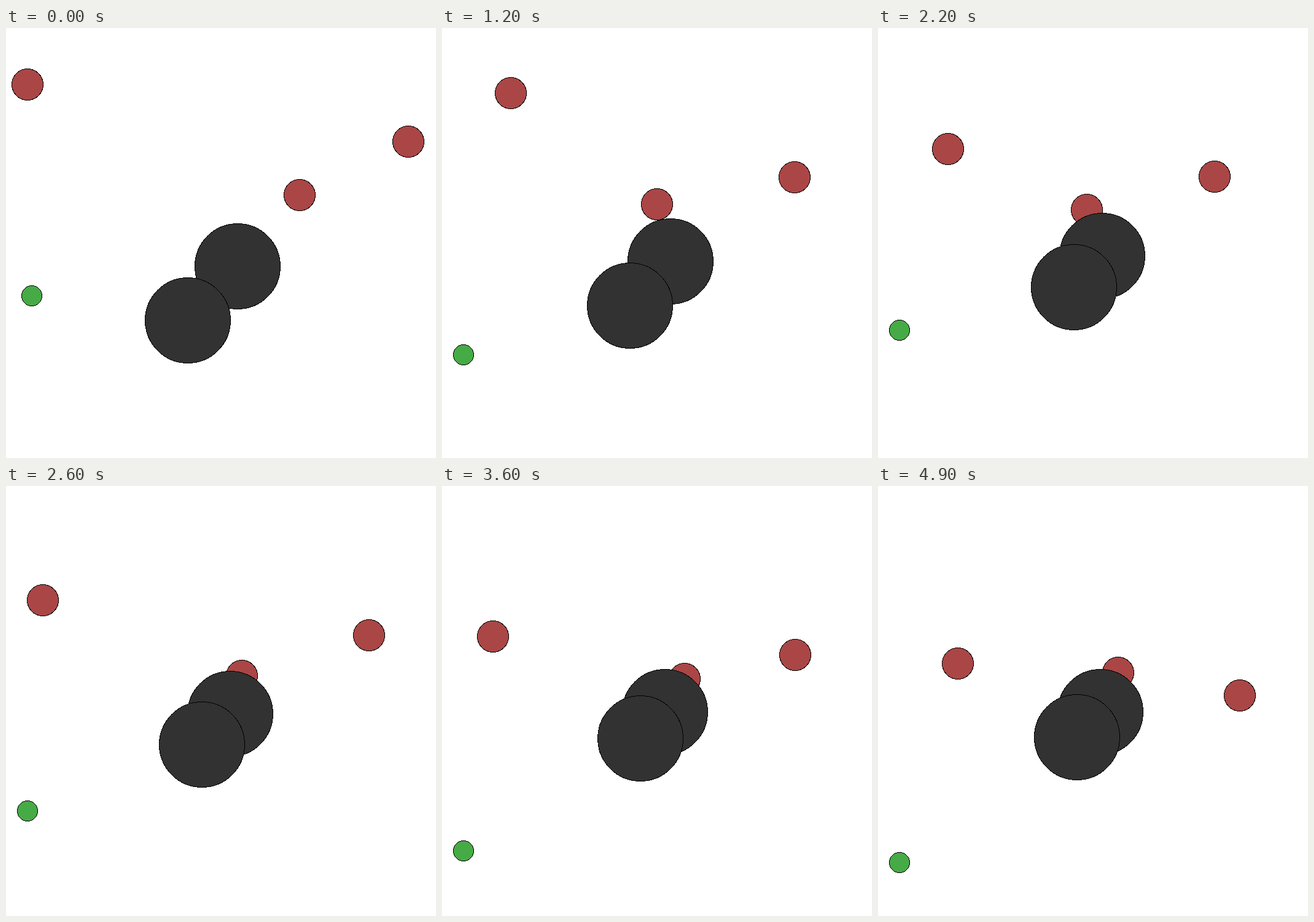
Write an HTML page that moves like this. It is 700 px wide and 700 px high and loops after 5000 ms.

```html
<!DOCTYPE html>
<html>
<head>
<meta charset="utf-8">
<style>
  html, body { margin: 0; height: 100%; overflow: hidden; background: #fff; }
  svg { display: block; }
  circle { stroke: #000; shape-rendering: crispEdges; }
</style>
</head>
<body>
<svg id="stage" width="700" height="700"></svg>
<script>
const FRAME = 100, FRAMES = 50, GAP = 7;

// Smooth curve through values that lie GAP frames apart
function curve(...v) {
  const last = v.length - 1;
  return t => {
    const i = Math.min(Math.floor(t / GAP), last - 1), s = t / GAP - i;
    const b = v[i], c = v[i + 1], a = v[i - 1] ?? b, d = v[i + 2] ?? c;
    return b + s / 2 * (c - a + s * (2 * a - 5 * b + 4 * c - d + s * (3 * (b - c) + d - a)));
  };
}

// The two big balls glide towards each other in step
const approach = curve(.06, .14, .506, .801, .849, .962, .985, 1);
const glide = (from, by) => t => from + by * approach(t);

const red = (x, y) => ({ r: 26, fill: '#aa4646', x, y });
const dark = (x, y) => ({ r: 70, fill: '#323232', x, y });
const green = (x, y) => ({ r: 17, fill: '#46aa46', x, y });

const balls = [
  red(curve(35, 53, 130, 123, 44, 79, 107, 130),
      curve(92, 98, 116, 194, 186, 239, 274, 289)),
  red(curve(655, 614, 561, 543, 604, 575, 593, 589),
      curve(185, 219, 249, 242, 246, 271, 305, 341)),
  red(curve(478, 427, 328, 333, 400, 396, 391, 391),
      curve(272, 293, 285, 293, 314, 314, 309, 304)),
  green(t => Math.max(35, 42 - 2 * t),
        curve(436, 475, 544, 490, 547, 585, 656, 613)),
  dark(glide(378, -15.9), glide(389, -21.5)),
  dark(glide(294.4, 29.8), glide(480, -71)),
];

const stage = document.getElementById('stage');
for (const ball of balls) {
  ball.node = document.createElementNS(stage.namespaceURI, 'circle');
  ball.node.setAttribute('r', ball.r - 0.5);
  ball.node.setAttribute('fill', ball.fill);
  stage.append(ball.node);
}

const start = performance.now();
function tick() {
  const t = Math.floor((performance.now() - start) / FRAME) % FRAMES;
  for (const { node, x, y } of balls) {
    node.setAttribute('cx', Math.round(x(t)));
    node.setAttribute('cy', Math.round(y(t)));
  }
  requestAnimationFrame(tick);
}
tick();
</script>
</body>
</html>
```
